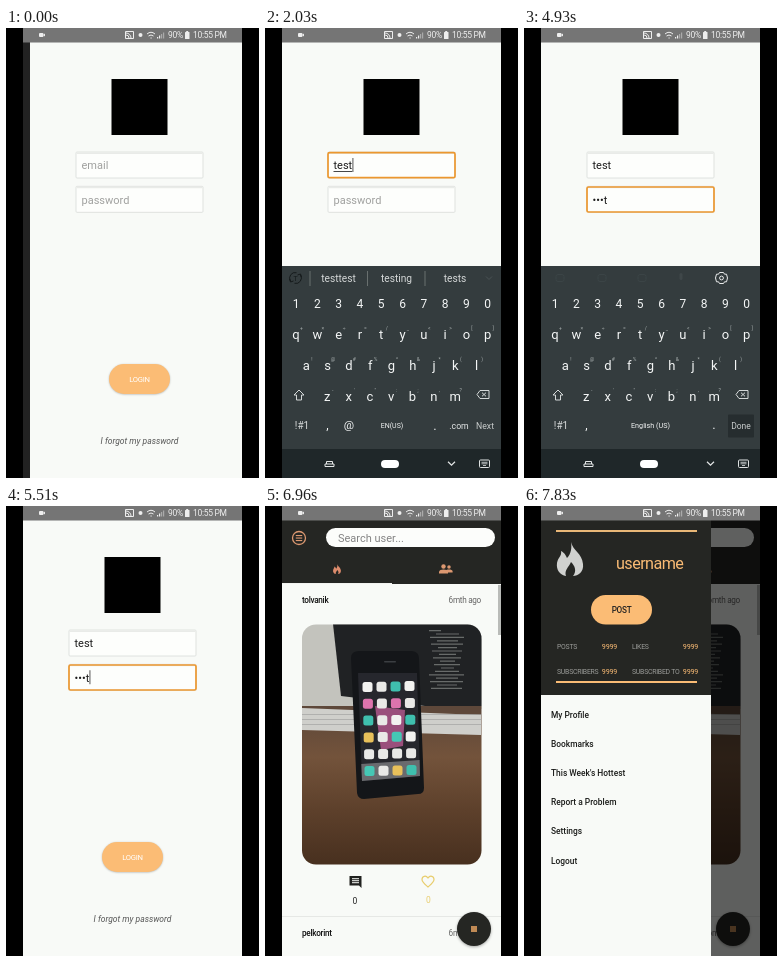
Animation, 253 px wide and 450 px high, one loop 8 s. Source, as an HTML page with a canvas:

```html
<!DOCTYPE html>
<html lang="en">
<head>
<meta charset="utf-8">
<style>
html, body { margin: 0; width: 100%; height: 100%; overflow: hidden; background: #000; }
canvas { display: block; width: 100vw; height: 100vh; }
</style>
</head>
<body>
<canvas></canvas>
<script>
const LOOP = 8000, STEP = 290, W = 253, H = 450;
const PAGE = '#f8faf7', DARK = '#252623', PEACH = '#fbbc75', COPPER = '#dc9871', KEYS = '#343c3e';
const canvas = document.querySelector('canvas');
const c = canvas.getContext('2d');

// ---------- drawing helpers ----------
function text(s, x, y, size, color, align = 'left', style = '') {
  c.font = `${style} ${size}px Roboto, sans-serif`;
  c.fillStyle = color;
  c.textAlign = align;
  c.fillText(s, x, y);
}
// Small labels are set with slightly tighter tracking.
function label(s, x, y, size, ...rest) {
  c.letterSpacing = -.035 * size + 'px';
  text(s, x, y, size, ...rest);
  c.letterSpacing = '0px';
}
function box(x, y, w, h, fill, r = 0, stroke, line = 1) {
  c.beginPath();
  c.roundRect(x, y, w, h, r);
  if (fill) { c.fillStyle = fill; c.fill(); }
  if (stroke) { c.strokeStyle = stroke; c.lineWidth = line; c.stroke(); }
}
function disc(x, y, r, fill, stroke, line = 1) {
  box(x - r, y - r, 2 * r, 2 * r, fill, r, stroke, line);
}
function shape(d, x, y, fill, stroke, line = 1, scale = 1) {
  c.save();
  c.translate(x, y);
  c.scale(scale, scale);
  const path = new Path2D(d);
  if (fill) { c.fillStyle = fill; c.fill(path); }
  if (stroke) { c.strokeStyle = stroke; c.lineWidth = line; c.stroke(path); }
  c.restore();
}
function shifted(dx, dy, draw) {
  c.save();
  c.translate(dx, dy);
  draw();
  c.restore();
}
function shadowed(color, blur, dy, draw) {
  c.save();
  c.shadowColor = color;
  c.shadowBlur = blur * canvas.height / H;
  c.shadowOffsetY = dy * canvas.height / H;
  draw();
  c.restore();
}

// ---------- icons ----------
const FLAME = 'M1-17C3-8 12-6 13 5C14 13 8 17 3 17C7 12 5 7 1 3C-1 8-6 11-4 17C-10 16-14 11-13 4C-12-2-8-3-9-8C-5-6-4-3-3-1C1-5 2-11 1-17Z';
const HEART = 'M0 5.5C-4 2-6 .5-6-2C-6-5.5-2-6.5 0-3.5C2-6.5 6-5.5 6-2C6 .5 4 2 0 5.5Z';

function gear(x, y, color) {
  shape('M-2-5.5H2L3-3.8H5L6 0L5 3.8H3L2 5.5H-2L-3 3.8H-5L-6 0L-5-3.8H-3Z', x, y, null, color);
  disc(x, y, 1.9, null, color);
}
function cycleIcon(x, y, color) {
  shape('M-5 3A5.5 5.5 0 0 1 1-5.3M5-3A5.5 5.5 0 0 1-1 5.3M-6 1L-5 4L-2 3M6-1L5-4L2-3', x, y, null, color);
  text('T', x, y + 2.5, 7, color, 'center');
}
function person(x, y, s, color) {
  disc(x, y - 2.5 * s, 2.2 * s, color);
  shape('M-4.5 4.5V3C-4.5-.3 4.5-.3 4.5 3V4.5Z', x, y, color, null, 0, s);
}

// ---------- status bar ----------
function statusBar() {
  const ink = '#eee';
  box(17, 0, 219, 14.5, '#757575');
  box(33, 5, 4.5, 4, ink, 1);
  shape('M0 0L2-1.5V1.5Z', 37, 7, ink);
  box(119.5, 3.5, 8, 7, null, 0, ink);
  shape('M-2 2A3 3 0 0 1 1 5M-2 0A5 5 0 0 1 3 5', 122, 5, null, ink);
  disc(134.5, 7, 2, ink);
  shape('M-4-2Q0-5.5 4-2M-2.5 0Q0-2 2.5 0M-.5 2H.7', 145, 8, null, ink);
  for (let i = 0; i < 4; i++) box(151 + 2 * i, 9 - i * 1.5, 1.2, 1.5 + i * 1.5, i < 2 ? ink : '#aaa');
  label('90%', 162, 10.3, 8.5, ink);
  box(179, 4, 4.5, 7, ink, .5);
  box(180.2, 3, 2, 1, ink);
  label('10:55 PM', 187, 10.3, 8.5, ink);
}

// ---------- login page ----------
function field(y, value, hint, focused, caret, underline) {
  box(63, y, 127, 26, '#fdfefc', 1, '#dfe2df');
  box(63.5, y + .5, 126, 1.5, '#e9ebe8');
  if (focused) box(63, y + .7, 127, 25, null, 1.5, '#ec972f', 1.7);
  text(value || hint, 68.5, y + 17.2, 11, value ? '#1c1c1c' : '#a0a19f');
  const width = value ? c.measureText(value).width : 0;
  if (underline && value) box(68.5, y + 19, width, .9, '#333');
  if (caret) box(68.7 + width, y + 6, 1, 14, '#555');
}
function loginPage(s) {
  box(17, 14, 219, 436, PAGE);
  box(98.5, 51, 56, 56, '#000');
  field(124, s.email, 'email', s.focus === 'email', s.caret && s.focus === 'email', s.focus === 'email');
  field(158.3, s.password, 'password', s.focus === 'password', s.caret && s.focus === 'password');
  // The footer moves up as the keyboard comes in.
  shifted(0, s.keyboard ? -s.keyboard.drop : 0, () => {
    shadowed('#0004', 2, .5, () => box(96, 336, 61, 30, s.pressed ? '#f3b068' : PEACH, 15));
    label('LOGIN', 126.5, 354, 7.7, '#fff', 'center');
    text('I forgot my password', 126.5, 416, 8.5, '#555', 'center', 'italic');
  });
}
function autofillPopup(alpha) {
  c.save();
  c.globalAlpha = alpha;
  box(66, 157, 123, 67.5, '#fbfcfa', 1, '#dcdedb');
  c.globalAlpha = Math.min(1, alpha + .25);
  text('ZELVORN', 74, 169, 5.2, '#555', 'left', 'bold');
  text('Pass', 99, 170, 10.5, '#555', 'left', 'bold');
  gear(175, 166, '#888');
  ['Next time use Zelvorn', 'Pass to autofill this field', 'using biometrics instead', 'of typing.']
    .forEach((line, i) => text(line, 74, 187 + i * 9.4, 8, '#6c6c6c'));
  c.restore();
}

// ---------- keyboard ----------
const ROWS = [
  { keys: '1234567890', x: 31, y: 280 },
  { keys: 'qwertyuiop', x: 31, y: 311, alt: '+×÷=/_<>[]' },
  { keys: 'asdfghjkl', x: 41.3, y: 342, alt: '!@#%^&*()' },
  { keys: 'zxcvbnm', x: 62.3, y: 373, alt: '-\'":;,?' }
];
function toolbar(s) {
  if (s.words) {
    cycleIcon(30.5, 250, '#151a1b');
    s.words.forEach((word, i) => {
      box([44.5, 102, 159.5][i], 243, 1, 15, '#69706f');
      text(word, [73.5, 131.5, 190][i], 254, 10.2, '#d5d8d8', 'center');
    });
    shape('M-3-1.5L0 1.5L3-1.5', 224, 250, null, '#4b5355');
  } else if (s.focus === 'password') {
    [36, 78, 118].forEach(x => box(x - 4, 246.5, 8, 7, null, 2, '#3b4446'));
    box(155.5, 245, 3, 7, '#3f4749', 1.5);
    gear(197.5, 250, '#e8eaea');
  } else {
    cycleIcon(30.5, 250, '#fff');
    box(44.5, 242, 1, 16, '#eee');
    box(163.7, 244.5, 3.6, 7, '#fff', 1.8);
    shape('M-3.5 0A3.5 3.5 0 0 0 3.5 0M0 3.5V6', 165.5, 250, null, '#fff');
    gear(200.5, 250, '#fff');
  }
}
function keyboard(s) {
  const { drop, alpha } = s.keyboard;
  c.globalAlpha = alpha;
  box(17, 238 + drop, 219, 183 - drop, KEYS);
  box(17, 421, 219, 29, alpha < 1 ? KEYS : '#1f2729');
  c.globalAlpha = 1;
  shifted(0, drop, () => {
    toolbar(s);
    for (const { keys, x, y, alt } of ROWS) [...keys].forEach((key, i) => {
      const kx = x + i * 21.3;
      if (s.key === key) box(kx - 9.5, y - 17, 19, 24, '#4c5658', 2);
      text(key, kx, y, y === 280 ? 12 : 13, '#f4f6f6', 'center');
      if (alt) text(alt[i], kx + 5.5, y - 9.5, 5, alpha < 1 ? '#e4e6e6' : '#a9b0b0', 'center');
    });
    shape('M0-5L5 0H2.5V5H-2.5V0H-5Z', 34, 367, null, '#d4d8d8');
    shape('M-6 0L-3-4H6V4H-3ZM-1-1.8L3 1.8M3-1.8L-1 1.8', 218, 366.5, null, '#d4d8d8');
    const done = s.focus === 'password';
    text('!#1', 37, 401, 10, '#d8dbdb', 'center');
    text(',', 62.5, 400.5, 12, '#f4f6f6', 'center');
    if (done) {
      if (s.donePressed) box(204, 386.5, 26, 23, '#262d2f', 1);
      text('English (US)', 126.5, 400, 7.2, '#f4f6f6', 'center');
      text('.', 190, 401, 13, '#f4f6f6', 'center');
      text('Done', 217, 400.5, 8.5, '#c9cdcd', 'center');
    } else {
      text('@', 84, 401, 11.5, '#f4f6f6', 'center');
      text('EN(US)', 127, 400, 7, '#f4f6f6', 'center');
      text('.', 170, 402, 13, '#f4f6f6', 'center');
      text('.com', 194, 400.5, 8.7, '#e4e7e7', 'center');
      text('Next', 220, 400.5, 8.7, '#c9cdcd', 'center');
    }
  });
  shape('M-3 0V-2.5H3V0M-4.5 0H4.5V2.5H-4.5Z', 64.5, 436, null, '#e4e7e7');
  box(116, 432, 18, 8, '#fff', 4);
  shape('M-3.5-1.7L0 1.7L3.5-1.7', 186.5, 435.5, null, '#e4e7e7', 1.2);
  box(214.5, 432, 10, 7.5, null, 1, '#dfe2e2');
  shape('M-3-1.5H3M-3 0H3M-1.5 1.7H1.5', 219.5, 435.8, null, '#dfe2e2', .8);
}

// ---------- home page ----------
function photo() {
  c.save();
  c.beginPath();
  c.roundRect(37, 118.5, 179.5, 240, 14);
  c.clip();
  box(37, 118, 180, 85, '#c3c3bd');
  shape('M68 118H217V200L160 200L76 190Z', 0, 0, '#202224');
  for (let i = 0; i < 18; i++)
    box(164 + (i * 7) % 13, 124 + i * 3.4, 12 + (i * 11) % 24, 1.2, '#686b6a');
  const desk = c.createLinearGradient(0, 205, 0, 358);
  desk.addColorStop(0, '#5e483a');
  desk.addColorStop(.3, '#73533b');
  desk.addColorStop(.65, '#5d402b');
  desk.addColorStop(1, '#48301f');
  box(37, 200, 180, 159, desk);
  shape('M37 202L216 209V229L37 224Z', 0, 0, '#cfcfcb');
  for (let i = 0; i < 3; i++) box(37, 208 + i * 5, 180, .8, '#a6a6a4');
  shape('M94 145L147 145Q154 146 154 152L159 282Q159 288 153 288L99 293Q93 293 92 287L86 152Q86 145 94 145Z', 0, 0, '#141619');
  shape('M93 167L152 167L155 270L97 275Z', 0, 0, '#26272d');
  shape('M110 200L140 204L138 240L116 244Z', 0, 0, '#9a4f7c');
  shape('M96.3 258L154.6 254L155 270L97 275Z', 0, 0, '#696a6e');
  const tints = ['#f2f2f0', '#45c7b5', '#e9e9e7', '#e8c05a', '#3fbfae', '#dd74ad'];
  for (let row = 0; row < 6; row++)
    for (let col = 0; col < 4; col++)
      box(97.5 + col * 14 + row * .4, 176 + row * 16.8 - col * .3, 10, 10, tints[(row * 5 + col * 2 + row * col) % 6], 2.5);
  box(119, 155, 12, 1.5, '#3b3e42', 1);
  c.restore();
}
function homePage() {
  box(17, 14, 219, 436, PAGE);
  box(17, 14, 219, 64, DARK);
  box(17, 77, 110, 1, '#f1f2ef');
  disc(34, 32, 6.5, null, COPPER, 1.3);
  for (let i = 0; i < 3; i++) box(30.8, 29 + i * 2.5, 6.4, 1.1, COPPER);
  box(61, 22, 169, 19, '#fcfdfb', 9.5);
  text('Search user...', 73, 36, 11, '#858585');
  shape(FLAME, 72, 63, '#dd8b6c', null, 0, .3);
  person(184, 63, .8, COPPER);
  person(178.5, 63, 1, COPPER);

  label('tolvanik', 37, 97, 8.2, '#111', 'left', '500');
  label('6mth ago', 216, 97, 8.2, '#666', 'right');
  photo();
  shape('M-6-6H6V6L3.5 3.5H-6Z', 90.5, 376, '#20211f');
  for (let i = 0; i < 3; i++) box(87, 372.2 + i * 2, 7, 1, PAGE);
  text('0', 90, 397.5, 8.5, '#222', 'center');
  shape(HEART, 163, 375.5, null, '#e8cd6d', 1.2);
  text('0', 163.5, 397, 8.5, '#e8cd6d', 'center');
  box(17, 410, 219, 1, '#e6e8e5');
  label('pelkorint', 37, 430, 8.2, '#111', 'left', '500');
  label('6mth ago', 216, 430, 8.2, '#666', 'right');
  box(233, 79, 3, 50, '#b9bbb8');
  shadowed('#0005', 3, 1, () => disc(209, 423, 17, DARK));
  box(206, 420, 6, 6, '#c08a55');
}

// ---------- drawer ----------
function drawer(open) {
  box(17, 14, 219, 436, `rgba(0,0,0,${.62 * open})`);
  shifted(-170 * (1 - open), 0, () => {
    box(17, 14, 170, 436, PAGE);
    box(17, 14, 170, 175, DARK);
    box(32, 24, 141, 2, '#e9b777');
    box(32, 175, 141, 2, PEACH);
    shape(FLAME, 46, 53, '#d0d1cf');
    label('username', 92, 63, 16.2, PEACH);
    box(67, 89, 61, 29.5, PEACH, 15);
    label('POST', 97.5, 107, 8.2, '#222', 'center', '500');
    [['POSTS', 33, 143, 93], ['LIKES', 108, 143, 174], ['SUBSCRIBERS', 33, 167.5, 93], ['SUBSCRIBED TO', 108, 167.5, 174]]
      .forEach(([name, x, y, right]) => {
        label(name, x, y, 6.9, '#9b9c99');
        label('9999', right, y, 7.2, PEACH, 'right');
      });
    ['My Profile', 'Bookmarks', 'This Week\'s Hottest', 'Report a Problem', 'Settings', 'Logout']
      .forEach((item, i) => text(item, 27, 211.8 + i * 29.15, 8.4, '#1b1c1a', 'left', '500'));
  });
}

// ---------- timeline: a list of [tick, changes], applied in order ----------
const UP = { drop: 0, alpha: 1 }, HALF = { drop: 29, alpha: .32 };
const TIMELINE = [
  [0, { loginX: 7, email: '', password: '' }],
  [1, { loginX: 0 }],
  [2, { focus: 'email', caret: true }],
  [3, { keyboard: HALF, popup: .6 }],
  [4, { keyboard: UP, popup: 1 }],
  [5, { popup: 0, email: 'te', key: 'e', words: ['the', 'test', 'to'] }],
  [6, { email: 'tes', key: 's', words: ['test', 'tests', 'testing'] }],
  [7, { email: 'test', key: '', words: ['testtest', 'testing', 'tests'] }],
  [8, { caret: false }],
  [9, { focus: 'password', caret: true }],
  [10, { words: null }],
  [11, { caret: false }],
  [12, { caret: true }],
  [14, { password: '•e', key: 'e' }],
  [15, { password: '••s', key: '' }],
  [17, { password: '•••t', caret: false, donePressed: true }],
  [18, { keyboard: HALF, donePressed: false }],
  [19, { keyboard: null, caret: true }],
  [20, { caret: false }],
  [21, { caret: true, pressed: true }],
  [22, { homeX: 110 }],
  [23, { homeX: 4 }],
  [24, { homeX: 0 }],
  [26, { drawer: .5 }],
  [27, { drawer: 1 }]
];
function stateAt(ms) {
  const tick = Math.floor(ms / STEP);
  return Object.assign({}, ...TIMELINE.filter(([t]) => t <= tick).map(([, change]) => change));
}

function render(ms) {
  const s = stateAt(ms);
  c.setTransform(canvas.width / W, 0, 0, canvas.height / H, 0, 0);
  box(0, 0, W, H, '#000');
  c.save();
  c.beginPath();
  c.rect(17, 0, 219, H);
  c.clip();
  box(17, 0, 219, H, '#222');
  if (s.homeX !== 0) shifted(s.loginX, 0, () => loginPage(s));
  if (s.popup) autofillPopup(s.popup);
  if (s.keyboard) keyboard(s);
  if (s.homeX !== undefined) shifted(s.homeX, 0, homePage);
  if (s.drawer) drawer(s.drawer);
  statusBar();
  c.restore();
}

function frame() {
  const w = Math.round(innerWidth * devicePixelRatio), h = Math.round(innerHeight * devicePixelRatio);
  if (canvas.width !== w || canvas.height !== h) { canvas.width = w; canvas.height = h; }
  render(performance.now() % LOOP);
  requestAnimationFrame(frame);
}
frame();
</script>
</body>
</html>
```
